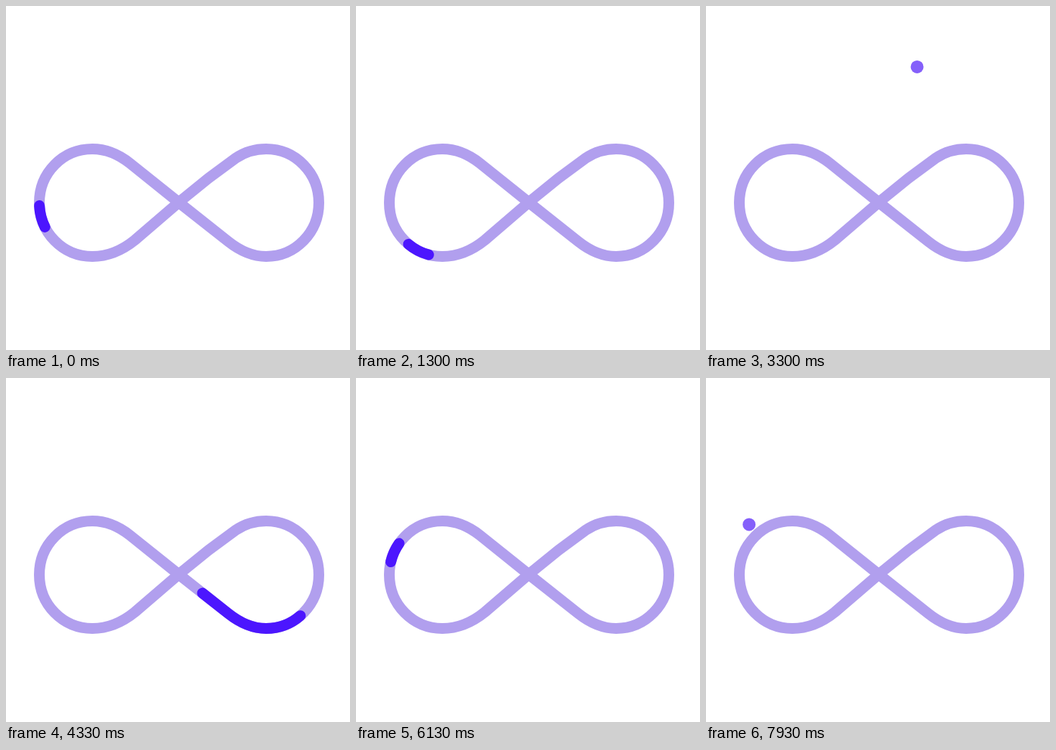
These frames come from a looping animation (480 by 480 pixels, 8010 ms). An HTML page:

```html
<!DOCTYPE html>
<html lang="en">
<head>
<meta charset="utf-8">
<title>Infinity loop</title>
<style>
  html, body { margin: 0; width: 100%; height: 100%; overflow: hidden; background: #fff; }
  svg { display: block; width: 100vw; height: 100vh; }
  path { fill: none; stroke-width: 15; }
  #ring { stroke: #b19fee; }
  #dash { stroke: #4c16fe; stroke-linecap: round; }
  #arc { stroke: none; }
  #ball { fill: #8560fa; }
</style>
</head>
<body>
<svg viewBox="0 0 480 480">
  <path id="ring"/>
  <path id="dash"/>
  <path id="arc" d="M437 275C437 155 311 73 241 73S45 155 45 275"/>
  <circle id="ball" r="9"/>
</svg>
<script>
const [ring, dash, arc, ball] = ['ring', 'dash', 'arc', 'ball'].map(id => document.getElementById(id));

// One lap, starting and ending at the far left, heading down.
const lap = 'C46.5 316 79 349.5 120.5 349.5C140 349.5 159 343.5 180 326.5L241 274L283 240L321 212' +
  'C333 204 347 199.5 363 199.5C404 199.5 436.5 233 436.5 274.5C436.5 316 404 349.5 363 349.5' +
  'C343 349.5 327 342 310 328.5L241 274L173 219.5C156 206 140 199.5 120.5 199.5C79 199.5 46.5 233 46.5 274.5';
ring.setAttribute('d', 'M46.5 274.5' + lap);
dash.setAttribute('d', 'M46.5 274.5' + lap + lap); // two laps, so a dash may cross the start

const L = ring.getTotalLength(), A = arc.getTotalLength();
const LOOP = 8010, HALF = 4, REST = 1.45, TURN = 1.5, LAUNCH = 2.62, GONE = 2.68, RIGHT = 525;

const clamp = u => Math.min(1, Math.max(0, u));
const mix = (a, b, u) => a + (b - a) * u;
const easeIn = (u, p) => clamp(u) ** p;
const easeOut = (u, p) => 1 - (1 - clamp(u)) ** p;

// Flight: time in s, share of the arc covered.
const flight = [[LAUNCH, 0], [2.8, .27], [3.3, .41], [3.63, .5], [3.933, .881], [HALF, 1]];
const rate = flight.slice(1).map(([t, f], i) => (f - flight[i][1]) / (t - flight[i][0]));
const slope = flight.map((_, i) => {
  const a = rate[i - 1], b = rate[i];
  return a && b ? 2 * a * b / (a + b) : 1.5 * (a || b);
});

function flown(t) {
  let i = 0;
  while (i < flight.length - 2 && t > flight[i + 1][0]) i++;
  const [t0, a] = flight[i], [t1, b] = flight[i + 1];
  const d = t1 - t0, u = clamp((t - t0) / d), v = 1 - u;
  return a * v * v * (1 + 2 * u) + b * u * u * (3 - 2 * u) + d * u * v * (slope[i] * v - slope[i + 1] * u);
}

// Ends of the dash along the track: a fast lap that dies out, then a run back.
function dashEnds(t) {
  const low = L + 66.5, high = L + 97;
  if (t < TURN) return [mix(4, low, easeOut(t / REST, 2.86)), mix(35, high, easeOut(t / REST, 3.9))];
  return [
    mix(low, RIGHT, easeIn((t - TURN) / (LAUNCH - TURN), 2.89)),
    mix(high, RIGHT, easeIn((t - TURN) / (GONE - TURN), 2.7))
  ];
}

function draw(t) {
  const [from, to] = dashEnds(t);
  dash.style.display = t < GONE ? '' : 'none';
  dash.setAttribute('stroke-dasharray', `${Math.max(.01, to - from)} 9999`);
  dash.setAttribute('stroke-dashoffset', -from);

  ball.style.display = t >= LAUNCH ? '' : 'none';
  const p = arc.getPointAtLength(A * flown(t));
  ball.setAttribute('cx', p.x);
  ball.setAttribute('cy', p.y);
}

// Two pictures per 100 ms, shown for 30 and 70 ms.
function pose(ms) {
  const step = Math.min(79, Math.floor(ms / 100));
  return (step / 10 + (ms - step * 100 >= 30 ? 1 / 30 : 0)) % HALF;
}

const start = performance.now();
function tick() {
  draw(pose((performance.now() - start) % LOOP));
  requestAnimationFrame(tick);
}
tick();
</script>
</body>
</html>
```
